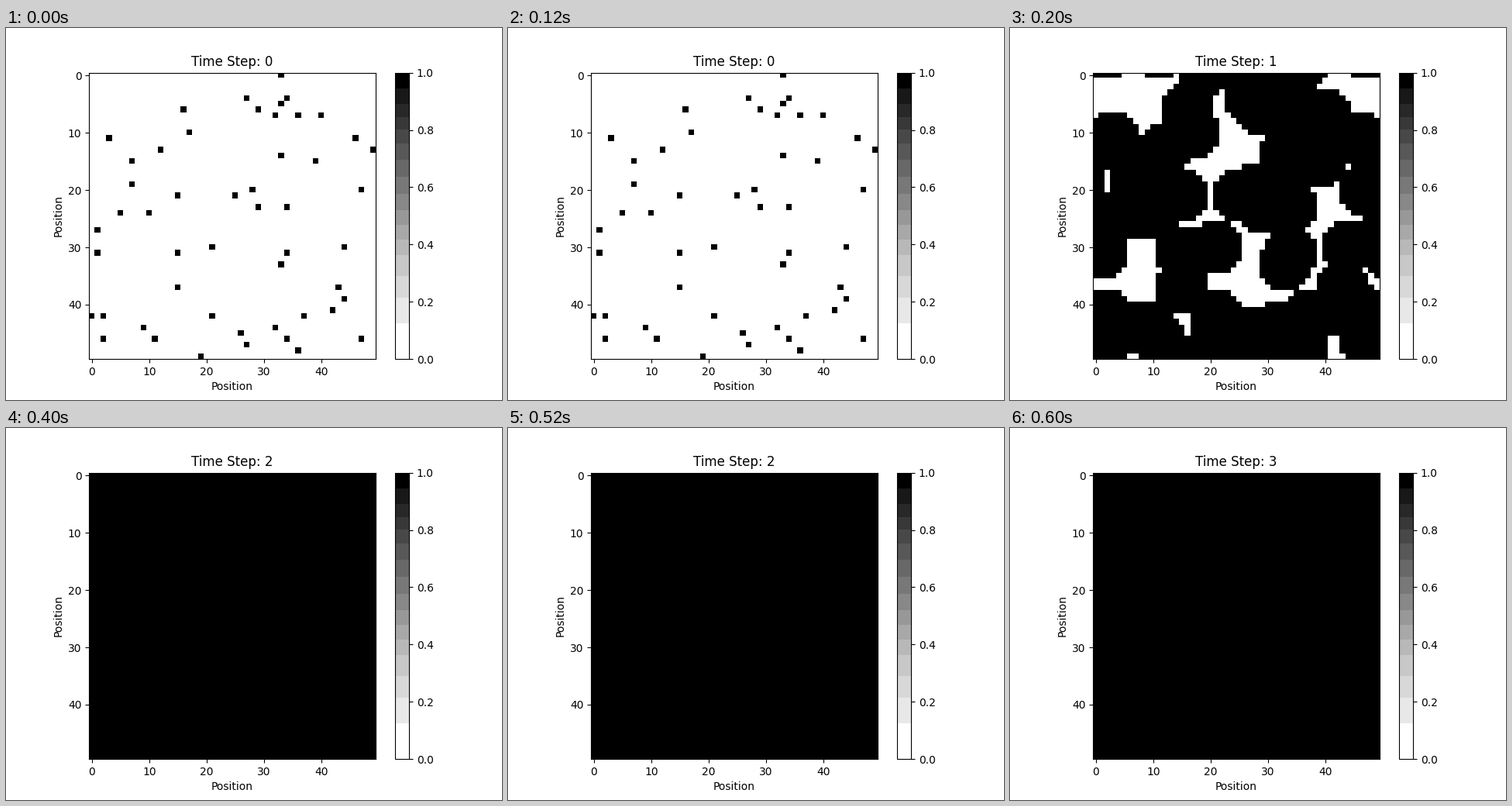
Recreate the animation shown at these times as a matplotlib script. Size 640 by 480 pixels, loop 0.8 s.

```python
import numpy as np
import matplotlib.pyplot as plt
from matplotlib.animation import FuncAnimation
from matplotlib.colors import ListedColormap

SIZE = 50
RADIUS = 4.5
STEPS = 4

# (column, row) of the cells that are active at the start
SEEDS = [
    (33, 0), (27, 4), (34, 4), (33, 5), (16, 6), (29, 6), (32, 7), (36, 7),
    (40, 7), (17, 10), (3, 11), (46, 11), (12, 13), (49, 13), (33, 14),
    (7, 15), (39, 15), (7, 19), (28, 20), (47, 20), (15, 21), (25, 21),
    (29, 23), (34, 23), (5, 24), (10, 24), (1, 27), (21, 30), (44, 30),
    (1, 31), (15, 31), (34, 31), (33, 33), (15, 37), (43, 37), (44, 39),
    (42, 41), (0, 42), (2, 42), (21, 42), (37, 42), (9, 44), (32, 44),
    (26, 45), (2, 46), (11, 46), (34, 46), (47, 46), (27, 47), (36, 48),
    (19, 49),
]


def start_grid():
    grid = np.zeros((SIZE, SIZE))
    cols, rows = zip(*SEEDS)
    grid[rows, cols] = 1
    return grid


def spread(grid):
    """Activate every cell within RADIUS of an active one, wrapping at edges."""
    reach = range(-int(RADIUS), int(RADIUS) + 1)
    result = grid.copy()
    for dy in reach:
        for dx in reach:
            if np.hypot(dx, dy) <= RADIUS:
                result = np.maximum(result, np.roll(grid, (dy, dx), (0, 1)))
    return result


def grid_at(step):
    grid = start_grid()
    for _ in range(step):
        grid = spread(grid)
    return grid


def banded_greys():
    """The Greys colormap reduced to sixteen flat tones."""
    shades = plt.get_cmap("Greys")(np.arange(256))[:, :3].mean(axis=1) * 255
    band = np.clip(shades // 16, 0, 15)
    tones = np.select([band == 0, band == 15], [0, 255], band * 16 + 8) / 255
    return ListedColormap(np.column_stack([tones] * 3))


fig, ax = plt.subplots(figsize=(6.4, 4.8), dpi=100)
image = ax.imshow(start_grid(), cmap=banded_greys(), vmin=0, vmax=1)
fig.colorbar(image)
ax.set_xlabel("Position")
ax.set_ylabel("Position")
title = ax.set_title("Time Step: 0")


def update(step):
    image.set_data(grid_at(step))
    title.set_text(f"Time Step: {step}")
    return image, title


anim = FuncAnimation(fig, update, frames=STEPS, interval=200, repeat=True,
                     repeat_delay=0)
plt.show()
```
